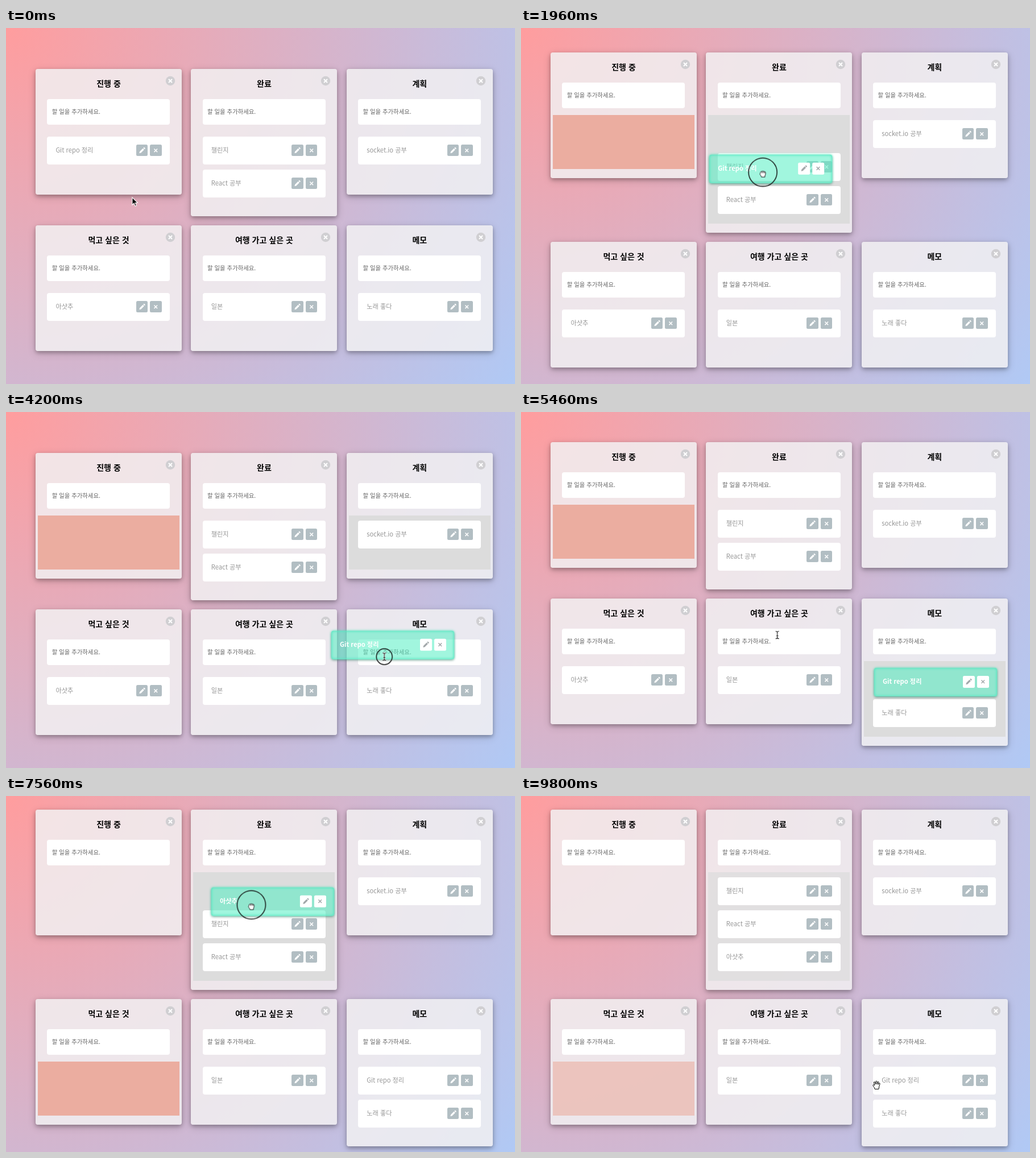
Write an HTML page that moves like this. It is 895 by 626 pixels and loops after 9.87 s.

```html
<!DOCTYPE html>
<html lang="ko">
<head>
<meta charset="utf-8">
<title>할 일 보드</title>
<style>
  html, body { margin: 0; width: 100%; height: 100%; overflow: hidden; }
  body {
    position: relative;
    background: radial-gradient(circle at 0 0, #ff9d9e, #b0c9f5);
    font-family: "Noto Sans CJK KR", "Noto Sans CJK", sans-serif;
  }
  div, svg { position: absolute; box-sizing: border-box; }
  svg { overflow: visible; }
  /* The rows stay centred while their cards grow and shrink. */
  .board {
    left: 52px; top: 0; height: 640px;
    display: flex; flex-direction: column; justify-content: center; gap: 16px;
  }
  .row { position: relative; display: flex; align-items: flex-start; gap: 16.4px; }
  .card {
    position: relative; flex: none; width: 257px; height: 221px; border-radius: 4px;
    background: rgba(242, 241, 242, .84);
    box-shadow: 0 3px 7px rgba(0, 0, 0, .28), 0 4px 16px rgba(0, 0, 0, .14);
  }
  .title {
    left: 0; top: 10px; width: 100%; line-height: 30px;
    text-align: center; font-size: 14px; font-weight: 700; color: #000;
  }
  .close { left: 228.5px; top: 12.5px; }
  .input {
    left: 20.4px; top: 52.7px; width: 216px; height: 45.4px; padding-left: 8.3px;
    border-radius: 4px; background: #fff; color: #636363;
    font-size: 10.4px; line-height: 44px; white-space: nowrap;
  }
  .list { left: 4px; top: 110px; bottom: 16px; width: 249px; }
  .item {
    left: 20.4px; width: 216px; height: 49.6px; padding-left: 15px;
    border-radius: 4px; background: #fff; color: #979797;
    font-size: 11.2px; font-weight: 500; line-height: 47.5px; white-space: nowrap;
  }
  .btn { top: 14.4px; width: 20.6px; height: 20.6px; border-radius: 2.5px; background: #b2bec3; color: #fff; }
  .btn svg { left: 0; top: 0; }
  .ghost {
    left: 0; top: 0; color: #fff; font-weight: 700; background: rgba(85, 239, 196, .55);
    box-shadow: 0 2px 4px rgba(0, 0, 0, .28), 0 0 4px #55efc4, inset 0 0 4px 1px #55e6c0;
  }
  .ghost .btn { background: #fff; color: #a3a9ab; }
  .cursor, .cursor * { left: 0; top: 0; }
  .ring { fill: none; stroke: #111; stroke-width: 1.5; vector-effect: non-scaling-stroke; }
</style>
</head>
<body>
<script>
const LOOP = 9870;
const PEN = '<path d="M5.4 15.2 6.1 12.2 11.6 6.7 13.9 9 8.4 14.5ZM12.3 6 13.3 5Q13.8 4.6 14.4 5.1L15.5 6.2Q16 6.8 15.6 7.3L14.6 8.3Z" fill="currentColor"/>';
const CROSS = '<path d="M7.5 7.5 13.1 13.1M13.1 7.5 7.5 13.1" stroke="currentColor" stroke-width="1.5"/>';
const CLOSE = '<circle cx="8" cy="8" r="8.2" fill="#d0cfd2"/><path d="M5 5 11 11M11 5 5 11" stroke="#fff" stroke-width="2"/>';
const BEAM = 'M-3-6.5Q0-6.5 0-4.5 0-6.5 3-6.5M0-4.5V4.5M-3 6.5Q0 6.5 0 4.5 0 6.5 3 6.5M-1.6 1.5H1.6';
const HAND = 'fill="#fff" stroke="#000" stroke-linejoin="round" stroke-linecap="round"';

// Two drags: when each is picked up, let go and settled.
const git = { grab: 910, release: 4130, drop: 5600, grip: [93, 28] };
const tea = { grab: 6930, release: 8960, drop: 9660, grip: [71, 27] };
// When the dragged item crosses into or out of a list.
const enterDone = 1480, leaveDone = 3440, enterMemo = 4340, enterDoneAgain = 7240;

function add(parent, cls, html = '') {
  const el = document.createElement('div');
  el.className = cls;
  el.innerHTML = html;
  parent.append(el);
  return el;
}

const svg = body => `<svg width="16" height="16">${body}</svg>`;
const px = v => v + 'px';
const slotTop = i => px(118.5 + 58 * i);
const cardHeight = n => px(Math.max(221, 143 + 58 * n));

// Points are [ms, value]; the ends of the loop are filled in.
function track(el, prop, points, easing = 'linear') {
  const all = [...points];
  if (all[0][0] > 0) all.unshift([0, all[0][1]]);
  if (all.at(-1)[0] < LOOP) all.push([LOOP, all.at(-1)[1]]);
  el.animate(all.map(([ms, v]) => ({ offset: ms / LOOP, [prop]: v, easing })),
    { duration: LOOP, iterations: Infinity });
}

// Holds a value, then eases to the next one from each given time.
function ease(el, prop, first, changes, format = v => v) {
  const points = [];
  let last = first;
  for (const [ms, v] of changes) {
    points.push([ms, format(last)], [Math.min(ms + 200, LOOP), format(v)]);
    last = v;
  }
  track(el, prop, points, 'ease');
}

function show(el, ...spans) {
  const points = spans.flatMap(([from, to]) => [[from, 1], [to, 0]]);
  if (points[0][0] > 0) points.unshift([0, 0]);
  track(el, 'opacity', points, 'steps(1, end)');
}

const path = (el, points) =>
  track(el, 'transform', points.map(([ms, x, y]) => [ms, `translate(${x}px, ${y}px)`]));

function card(row, title) {
  const el = add(row, 'card');
  const list = add(el, 'list');
  add(el, 'title', title);
  add(el, 'close', svg(CLOSE));
  add(el, 'input', '할 일을 추가하세요.');
  return { el, list };
}

function item(parent, text, index = 0, cls = 'item') {
  const el = add(parent, cls, text);
  if (cls === 'item') el.style.top = slotTop(index);
  add(el, 'btn', svg(PEN)).style.left = '156.4px';
  add(el, 'btn', svg(CROSS)).style.left = '181px';
  return el;
}

const board = add(document.body, 'board');
const [[doing, done, plan], [food, trip, memo]] = [
  ['진행 중', '완료', '계획'],
  ['먹고 싶은 것', '여행 가고 싶은 곳', '메모'],
].map(titles => {
  const row = add(board, 'row');
  return titles.map(t => card(row, t));
});

const challenge = item(done.el, '챌린지');
const react = item(done.el, 'React 공부', 1);
const song = item(memo.el, '노래 좋다');
item(plan.el, 'socket.io 공부');
item(trip.el, '일본');

// Lists make room for the dragged item.
ease(done.el, 'height', 2, [[enterDone, 3], [leaveDone, 2], [enterDoneAgain, 3]], cardHeight);
ease(memo.el, 'height', 1, [[enterMemo, 2]], cardHeight);
ease(challenge, 'top', 0, [[enterDone, 1], [2250, 0], [enterDoneAgain, 1], [8150, 0]], slotTop);
ease(react, 'top', 1, [[enterDone, 2], [2680, 1], [enterDoneAgain, 2], [8550, 1]], slotTop);
ease(song, 'top', 0, [[enterMemo, 1]], slotTop);

// List colours while dragging.
const grey = a => `rgba(220, 220, 220, ${a})`;
const coral = a => `rgba(235, 173, 160, ${a})`;
const tint = (list, ...changes) => ease(list, 'backgroundColor', grey(0), changes);
const fade = tea.drop + 70;
tint(doing.list, [git.grab, grey(1)], [enterDone - 220, coral(1)], [git.drop, coral(0)]);
tint(done.list, [enterDone, grey(1)], [leaveDone, grey(0)], [enterDoneAgain, grey(1)], [fade, grey(.6)]);
tint(plan.list, [leaveDone + 120, grey(1)], [enterMemo - 110, grey(0)]);
tint(memo.list, [enterMemo, grey(1)], [git.drop, grey(0)]);
tint(food.list, [tea.grab, grey(1)], [enterDoneAgain - 100, coral(1)], [fade, coral(.5)]);

// Pointer stops: [ms, x, y].
const stops = [
  [0, 222, 298], [560, 156, 202], [git.grab, 156, 202],
  [1900, 424, 250], [2950, 444, 312], [3800, 665, 290], [4200, 665, 430], [4400, 714, 478],
  [4900, 451, 392], [5460, 451, 392], [6440, 138, 511], [6650, 138, 481], [tea.grab, 138, 481],
  [7500, 432, 187], [tea.release - 60, 419, 288], [9310, 419, 288], [9800, 625, 508],
];

// One item shown at home, then as a ghost trailing the pointer, then at rest.
function drag(text, move, from, to, home, rest, restSlot, lastStop) {
  const lag = 50, start = move.grab + 35;
  const [gx, gy] = move.grip;
  const trail = stops
    .filter(([ms]) => ms > move.grab && ms <= lastStop)
    .map(([ms, x, y]) => [ms + lag, x - gx, y - gy]);
  const [, endX, endY] = trail.at(-1);
  const ghost = item(document.body, text, 0, 'item ghost');
  path(ghost, [[start, ...home], ...trail, [move.drop - 140, endX, endY], [move.drop, ...rest]]);
  show(item(from.el, text), [0, start]);
  show(ghost, [start, move.drop]);
  show(item(to.el, text, restSlot), [move.drop, LOOP]);
}
drag('Git repo 정리', git, doing, memo, [72.4, 190.5], [619.2, 446.5], 0, 4400);
drag('아샷추', tea, food, done, [72.4, 446.5], [345.8, 258.5], 2, tea.release);

const cursor = add(document.body, 'cursor');
const icon = (body, ...spans) => show(add(cursor, '', svg(body)), ...spans);
path(cursor, stops);

const ring = add(cursor, '', svg('<circle class="ring" r="25"/>')).querySelector('.ring');
track(ring, 'transform', [git, tea].flatMap(({ grab, release }) =>
  [[grab, 0], [grab + 140, 1], [release, 1], [release + 160, 0]].map(([ms, s]) => [ms, `scale(${s})`])));

icon('<path d="M0 0V13.2L3.1 10.3 5.2 15.2 7.5 14.2 5.4 9.5H9.5Z" fill="#000" stroke="#fff" stroke-width="1.1"/>',
  [0, 380], [git.drop, 6270]);
icon(`<path d="${BEAM}" fill="none" stroke="#fff" stroke-width="2.6"/><path d="${BEAM}" fill="none" stroke="#111" stroke-width="1.1"/>`,
  [git.release, git.drop]);
icon(`<path d="M-3 7Q-3.4 4.6-5.8 1.6-6.6.2-5.4-.2-4.4-.4-3.2 1L-4.6-4Q-4.6-5.4-3.6-5.4-2.8-5.4-2.4-4.2L-1.5-1-1.4-5.6Q-1.2-6.8-.3-6.8.7-6.8.8-5.6L.9-1.2 2-5Q2.4-6 3.2-5.8 4.1-5.5 3.8-4.2L3.2-.6 4.4-2.6Q5.2-3.5 5.9-2.9 6.4-2.4 6-1.4 4.6 2 4 7Z" ${HAND}/>`,
  [380, git.grab], [6270, tea.grab], [tea.release, LOOP]);
icon(`<g transform="translate(0 1)" stroke-width=".9"><path d="M-2.6 7Q-2.8 5.2-4.6 3.4-5.6 2-4.8 1.2L-4.2.8V-.6Q-4.2-2-3-2-2.4-3-1.2-2.6-.2-3.4.8-2.6 2-3.1 2.8-2 4.6-2.4 4.9-.4 5.2 3 3.8 5V7Z" ${HAND}/><path d="M-1.5.2V-1.6M.9 0V-1.7M3 .3V-1.2" ${HAND}/></g>`,
  [git.grab, git.release], [tea.grab, tea.release]);
</script>
</body>
</html>
```
